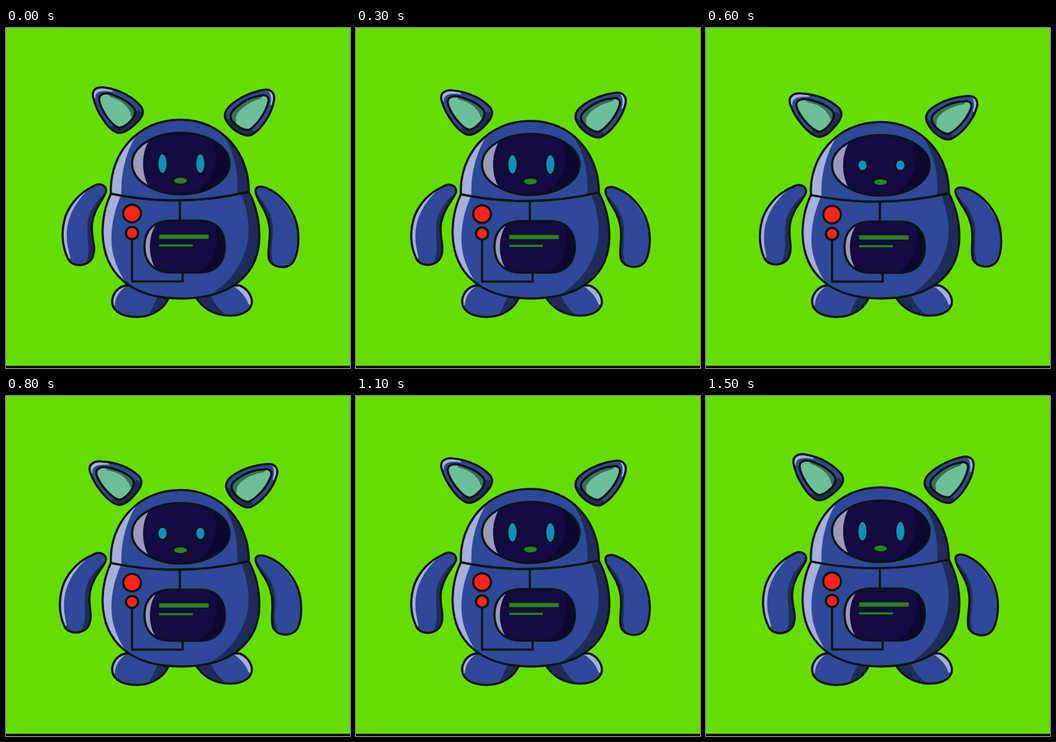
An HTML page that plays this animation: 554x548 px, repeating every 1.6 s.

```html
<!DOCTYPE html>
<html lang="en">
<head>
<meta charset="utf-8">
<title>Robot</title>
<style>
  html, body { margin: 0; width: 100%; height: 100%; overflow: hidden; background: #64de00; }
  svg { display: block; width: 554px; height: 548px; }
  .ink { stroke: #07150f; stroke-width: 3.5; stroke-linejoin: round; stroke-linecap: round; }
  .thin { stroke-width: 2; }
  .line { fill: none; }
</style>
</head>
<body>
<svg id="stage" viewBox="0 0 554 548"></svg>
<script>
const BLUE = '#2e4999', LIGHT = '#a5b0da', SHADE = '#1f2c5a';
const NAVY = '#130b41', GLASS = '#9c9aba', DEEP = '#0d0730';
const MINT = '#6cc095', MOSS = '#3e6c56', GREEN = '#2f7d25', RED = '#ff2418', EYE = '#0f90bd';

let clips = 0;

// An outlined shape with a highlight and a shadow clipped to its inside.
function part(outline, light, shade, [fill, lightFill, shadeFill] = [BLUE, LIGHT, SHADE]) {
  const id = 'clip' + clips++;
  return `<clipPath id="${id}"><path d="${outline}"/></clipPath>
    <path d="${outline}" fill="${fill}"/>
    <g clip-path="url(#${id})">
      <path d="${shade}" fill="${shadeFill}"/>
      <path d="${light}" fill="${lightFill}"/>
    </g>
    <path class="ink line" d="${outline}"/>`;
}
const line = d => `<path class="ink line" d="${d}"/>`;
const button = (cx, cy, r) => `<circle class="ink" cx="${cx}" cy="${cy}" r="${r}" fill="${RED}"/>`;
const oval = (cx, cy, rx, ry, fill, id) =>
  `<ellipse class="ink thin" id="${id}" cx="${cx}" cy="${cy}" rx="${rx}" ry="${ry}" fill="${fill}"/>`;
const bar = (x, y, w, h) =>
  `<rect x="${x}" y="${y}" width="${w}" height="${h}" fill="${GREEN}" stroke="#07150f"/>`;
const group = (id, ...items) => `<g id="${id}">${items.join('')}</g>`;

const glass = [NAVY, GLASS, DEEP], lining = [MINT, MINT, MOSS];

const feet = group('feet',
  part('M192 415C173 420 166 440 175 453C186 467 215 469 235 461C248 455 258 446 262 434L240 415Z',
       'M160 410L200 412C184 421 176 432 175 448L165 452Z',
       'M228 470C234 452 241 441 246 430L275 425V470Z'),
  part('M306 434C315 450 335 464 362 463.500C385 463 397 452 396 440C395 428 385 418 376 415L330 415Z',
       'M358 412C376 420 386 432 391 446L402 444V410Z',
       'M300 425L328 425C333 440 341 452 358 466L300 470Z'));

const body = group('body',
  part('M169 267C158 290 155.500 310 155.500 330C157 395 200 436 282 436C365 436 408 395 408 335C408 310 402 285 391 264Q280 290 169 267Z',
       'M150 255L186 268C171 300 165 340 174 370C181 394 193 414 208 428L150 440Z',
       'M376 260C393 300 396 340 381 370C369 400 345 422 315 438L420 440V260Z'),
  part('M169 267C166 205 210 147.800 281 147.800C350 147.800 392 205 391 264Q280 290 169 267Z',
       'M160 275L186 274C184 235 193 195 217 162L160 150Z',
       'M325 148C360 172 377 220 372 275L400 270V148Z'),
  part('M203 218.500A78.500 49.500 0 0 1 360 218.500A78.500 49.500 0 0 1 203 218.500Z',
       'M242 168C214 190 214 245 240 268L195 270V168Z',
       'M325 168C350 205 338 250 295 270L365 272V168Z', glass),
  oval(252, 218.5, 7.6, 16, EYE, 'eyeL'),
  oval(313, 218.5, 7.6, 16, EYE, 'eyeR'),
  oval(281, 246, 11.5, 5.8, GREEN, 'mouth'),
  line('M280 278V310M203 341V408.500H284.500V394'),
  part('M223 352C223 326 238 310.500 266 310.500H312C338 310.500 352.500 326 352.500 352S338 394 312 394H266C238 394 223 378 223 352Z',
       'M252 308C226 322 225 378 249 396L215 398V308Z',
       'M335 308C346 345 338 380 305 396L360 398V308Z', glass),
  bar(246, 332.3, 81, 8), bar(246, 348.3, 55.5, 4.6),
  button(203, 299, 14.3), button(203, 330.5, 9.8));

const armL = group('armL', part(
  'M139 256C150 248 163 253 161 264C158 275 142 290 138.500 315C136 340 146 350 140 368C135 384 108 388 100 372C89 350 89 325 96 303C104 282 120 265 139 256Z',
  'M146 248C118 272 92 302 99 350L104 372L80 370V250Z',
  'M165 260C145 278 132 296 131 318C130 345 138 358 126 386L165 386Z'));

const armR = group('armR', part(
  'M402 264C400 255 411 253.500 422 259C445 269 466 296 470 325C473 350 468 370 461 379C450 390 430 386 424 374C419 360 428 340 424 318C420 292 404 279 402 264Z',
  'M418 255C441 270 456 287 468 318L476 318V255Z',
  'M398 262C418 282 429 300 430 322C431 345 422 362 434 390L398 390Z'));

const earL = group('earL',
  part('M140 110C138 97 150 94 160 96C185 100 205 112 217 126C223 134 220 143 212 151C203 160 192 170 180 169C165 165 145 135 140 110Z',
       'M135 114L144 113C143 103 152 99 172 103L170 88H135Z',
       'M168 160L214 132L228 150L190 176Z'),
  part('M150 116C149 105 162 101.500 180 111C195 117 205 126 208 133C210 143 195 159 182 161C168 156 152 130 150 116Z',
       'M0 0', 'M158 98L168 111C187 117 199 127 202 143L218 140V98Z', lining));

const earR = group('earR',
  part('M416 99.500C428 98 433.500 106 431.500 117C428 139 412 162 396 172C385 177 365 165 356.500 152C350 143 352 134 360 126C374 113 395 103 416 99.500Z',
       'M412 94C427 101 428 110 426 124L440 124V92Z',
       'M350 142L400 166L388 182L350 160Z'),
  part('M410 109C420 106 425 112 422 121C417 139 404 156 392 164C383 166 369 157 363 148C359 140 363 135 371 127.500C384 116 398 110.500 410 109Z',
       'M0 0', 'M420 102L410 114C392 119 375 130 370 144L371 162L352 150V102Z', lining));

const stage = document.getElementById('stage');
stage.innerHTML = '<rect width="554" height="548" fill="#64de00"/>' +
  feet + body + armL + armR + earL + earR +
  '<rect y="544.5" width="554" height="4" fill="#000"/>';

const set = (id, name, value) => document.getElementById(id).setAttribute(name, value);
const pose = (id, drop, angle, pivot) =>
  set(id, 'transform', `translate(0 ${drop}) rotate(${angle} ${pivot})`);

const LOOP = 1600, STEP = 100, LOWEST = 700;
const start = performance.now();

function draw() {
  const t = Math.floor((performance.now() - start) % LOOP / STEP) * STEP;
  const gap = Math.abs(t - LOWEST);
  const k = 0.875 - Math.min(gap, LOOP - gap) / 800;   // 0 at the loop start, largest when squashed

  set('body', 'transform', `translate(0 ${436 * 0.017 * k}) scale(1 ${1 - 0.017 * k})`);
  pose('armL', 1.5 * k, 4.4 * k, '150 258');
  pose('armR', 1.5 * k, -4.4 * k, '412 262');
  pose('earL', 5 * k, -9 * k, '205 155');
  pose('earR', 5 * k, 9 * k, '367 158');

  const open = Math.min(16, 2 + Math.abs(t - 690) * 0.075);
  set('eyeL', 'ry', open);
  set('eyeR', 'ry', open);
  requestAnimationFrame(draw);
}
draw();
</script>
</body>
</html>
```
